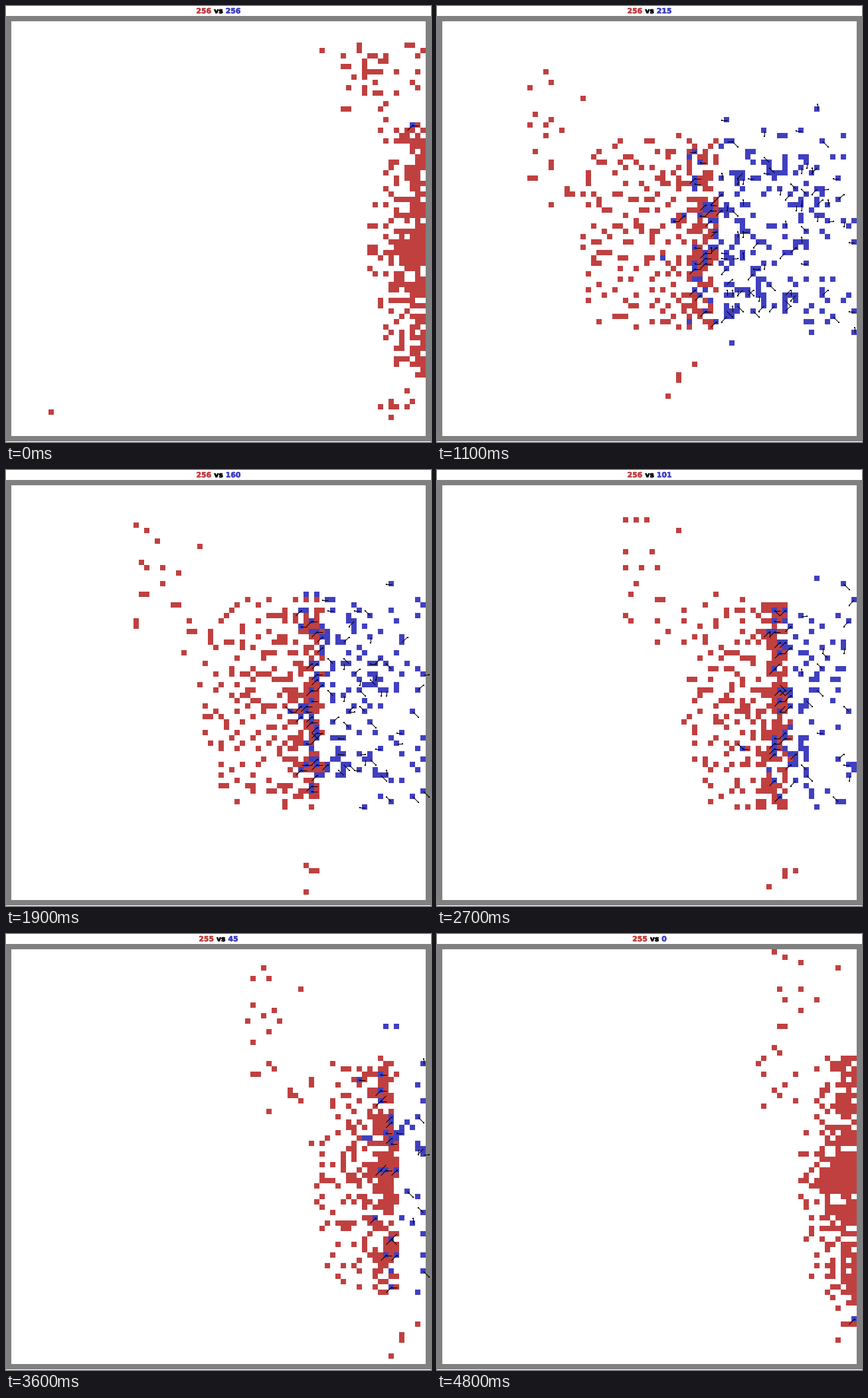
A matplotlib script that plays this animation: 640 px wide and 656 px high, repeating every 4900 ms.

```python
import numpy as np
import matplotlib.pyplot as plt
from matplotlib.animation import FuncAnimation
from matplotlib.collections import LineCollection
from matplotlib.patheffects import withStroke

W, H, DPI = 640, 656, 100
CELL, TOP, SIDE = 8, 15, 80
FRAMES, INTERVAL = 49, 100
END = FRAMES - 1
RED, BLUE, GRAY = (192, 64, 64), (64, 64, 192), (128, 128, 128)
N = 256
rng = np.random.default_rng(12)

SCORE_TIMES = (0, 1, 5, 11, 19, 27, 36, 48)
BLUE_LEFT = (256, 256, 249, 215, 160, 101, 45, 0)

# Flocks of red stragglers: size, (column, row) waypoints, spread
FLOCK_TIMES = (5, 19, 36, 48)
FLOCKS = [
    (13, [(12, 20), (25, 15), (46, 11), (64, 8)], (3.5, 6)),
    (9, [(16, 36), (35, 28), (53, 28), (63, 27)], (3, 4)),
    (4, [(36, 62), (57, 73), (74, 73), (77, 71)], (1.5, 2)),
]

AROUND = [(dx, dy) for dx in (-1, 0, 1) for dy in (-1, 0, 1) if dx or dy]
FAVOURED = ((-1, 1), (1, 0))  # sides from which reds always strike
NEAREST = sorted(
    ((dx, dy) for dx in range(-12, 13) for dy in range(-12, 13)),
    key=lambda d: d[0] ** 2 + d[1] ** 2 + .1 * (d[0] > 0),
)

# Each red keeps its rank behind the front and its place across it
index = np.arange(N)
rank = (index + .5) / N
across = 2 * (index * .618034 % 1) - 1
pace = rng.uniform(.4, 1.3, (2, N))
phase = rng.uniform(0, 2 * np.pi, (2, N))


def offsets(size, spread):
    """Random offsets; the first member sits on the path itself."""
    off = rng.normal(0, spread, (size, 2))
    off[0] = 0
    return off


flocks = [(np.array(path), offsets(size, spread))
          for size, path, spread in FLOCKS]


def blue_left(k):
    return int(round(np.interp(k, SCORE_TIMES, BLUE_LEFT)))


def to_cells(xy):
    cells = np.clip(np.rint(xy), 1, SIDE - 2).astype(int)
    return [tuple(c) for c in cells.tolist()]


def inside(c):
    return 0 < c[0] < SIDE - 1 and 0 < c[1] < SIDE - 1


def free_cell(c, taken):
    for dx, dy in NEAREST:
        spot = (c[0] + dx, c[1] + dy)
        if inside(spot) and spot not in taken:
            return spot
    return c


def blue_history():
    """Random walkers; those the front reaches first die first."""
    box = [(x, y) for x in range(42, 75) for y in range(23, 57)]
    walkers = [box[i] for i in rng.choice(len(box), N - 1, replace=False)]
    luck = rng.exponential(1.6, N - 1)
    history = [[(76, 20)]]
    for k in range(1, FRAMES):
        taken = set(walkers)
        for i, c in enumerate(walkers):
            dx, dy = np.rint(rng.normal(0, .8, 2)).astype(int).tolist()
            spot = (c[0] + dx, c[1] + dy)
            if inside(spot) and spot not in taken:
                taken.discard(c)
                taken.add(spot)
                walkers[i] = spot
        order = np.argsort([c[0] for c in walkers] + luck)
        keep = max(blue_left(k) - 1, 0)
        alive = order[len(walkers) - keep:]
        walkers = [walkers[i] for i in alive]
        luck = luck[alive]
        survivor = (78, round(34 + .75 * k))
        history.append([survivor, *walkers])
    return history


def army(k, n):
    """The main red body: a front moving right with a shrinking tail."""
    t = k / END
    pick = index[:n] if n == N else np.linspace(0, N - 1, n).astype(int)
    v, q = across[pick], rank[pick]
    sway = np.sin(pace[:, pick] * k + phase[:, pick])
    front = min(42 + .84 * k, 78)
    tail = (29 - 19 * t) * q ** (1.5 + .8 * t) * (1 - .4 * t * v ** 2)
    x = front - tail + sway[0]
    y = (39.5 + 4.5 * t
         + (16 + 7 * t) * np.sign(v) * np.abs(v) ** (1 + .3 * t)
         + 1.2 * sway[1])
    return to_cells(np.column_stack([x, y]))


def stragglers(k):
    cells = []
    for path, off in flocks:
        lead = [np.interp(k, FLOCK_TIMES, path[:, a]) for a in (0, 1)]
        wander = np.sin(.25 * k + off[:, ::-1]) * (off != 0)
        cells += to_cells(lead + off + wander)
    return cells


def leftovers():
    """Loose reds at the end of the previous battle."""
    cloud = rng.normal((69, 10), (5, 4.5), (40, 2))
    south = rng.normal((73, 72), (3, 2), (8, 2))
    return [(75, 21), (77, 20), (8, 74), *to_cells(cloud), *to_cells(south)]


def red_cells(k, blues):
    loose = stragglers(k) if k else leftovers()
    body = army(k or END, N - len(loose))
    taken, reds = set(blues), set()
    for c in loose + body:
        spot = free_cell(c, taken)
        taken.add(spot)
        reds.add(spot)
    return reds


def attacks(blues, reds):
    """Pairs of (attacker, hit cell)."""
    hits = []
    for x, y in blues:
        near = [d for d in AROUND if (x + d[0], y + d[1]) in reds]
        for d in near:
            if d in FAVOURED or rng.random() < .06:
                hits.append(((x + d[0], y + d[1]), (x, y)))
        if not near and rng.random() < .38:
            dx, dy = AROUND[rng.integers(8)]
            hits.append(((x, y), (x + dx, y + dy)))
    return hits


def center(c):
    return c[0] * CELL + 4.5, TOP + c[1] * CELL + 4.5


def build():
    scenes = []
    for k, blues in enumerate(blue_history()):
        reds = red_cells(k, blues)
        grid = np.full((SIDE, SIDE, 3), 255, np.uint8)
        grid[[0, -1]] = GRAY
        grid[:, [0, -1]] = GRAY
        for cells, color in ((reds, RED), (blues, BLUE)):
            for x, y in cells:
                grid[y, x] = color
        lines = [(center(a), center(b)) for a, b in attacks(blues, reds)]
        scenes.append((grid, lines))
    return scenes


scenes = build()
fig = plt.figure(figsize=(W / DPI, H / DPI), dpi=DPI, facecolor="white")
ax = fig.add_axes([0, 0, 1, 1])
ax.axis("off")
board = ax.imshow(scenes[0][0], extent=(0, W, TOP + SIDE * CELL, TOP),
                  interpolation="nearest", aspect="auto")
ax.set(xlim=(0, W), ylim=(H, 0))
shots = ax.add_collection(LineCollection([], colors="black", linewidths=.72,
                                         zorder=3))
dots = ax.scatter([], [], s=2.4, c="black", marker="s", linewidths=0, zorder=4)


def label(color):
    color = tuple(c / 255 for c in color)
    return ax.text(0, 11, "", color=color, fontsize=7.8, family="DejaVu Sans",
                   weight="bold", va="baseline",
                   path_effects=[withStroke(linewidth=.45, foreground=color)])


labels = [label(c) for c in (RED, (0, 0, 0), BLUE)]


def set_score(red, blue, gap=4):
    for t, s in zip(labels, (red, "vs", blue)):
        t.set_text(str(s))
    widths = [t.get_window_extent().width for t in labels]
    x = (W - sum(widths) - 2 * gap) / 2
    for t, w in zip(labels, widths):
        t.set_x(x)
        x += w + gap


def draw(k):
    grid, lines = scenes[k]
    board.set_data(grid)
    shots.set_segments(lines)
    dots.set_offsets([b for _, b in lines] or np.empty((0, 2)))
    set_score(N if k < 31 else N - 1, blue_left(k))
    return board, shots, dots, *labels


anim = FuncAnimation(fig, draw, frames=FRAMES, interval=INTERVAL, repeat=True)
plt.show()
```
